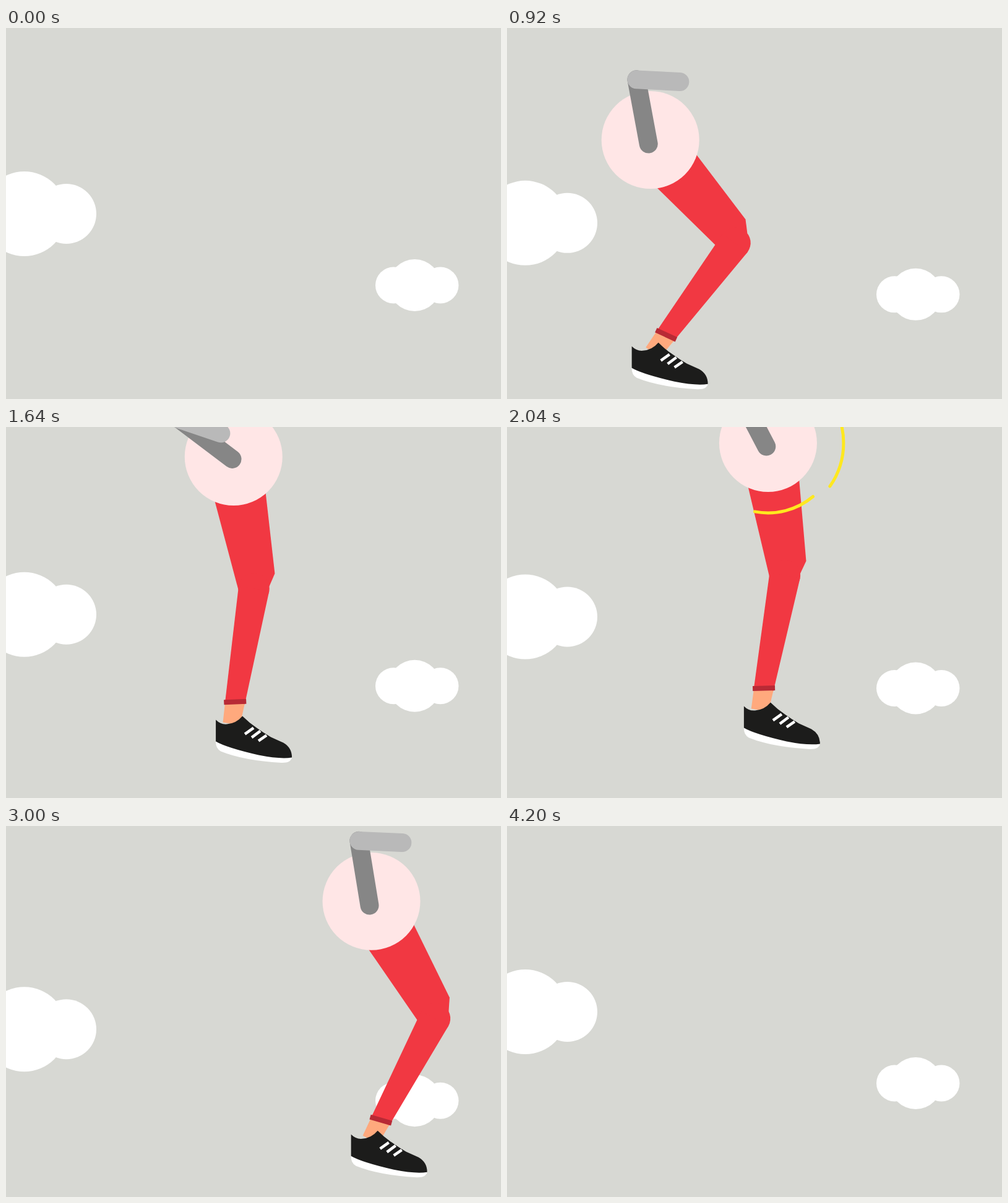
Recreate the animation shown at these times as an HTML page. Size 800 by 600 pixels, loop 4240 ms.

```html
<!DOCTYPE html>
<html lang="en">
<head>
<meta charset="utf-8">
<title>Hopper</title>
<style>
  html, body { margin: 0; width: 100%; height: 100%; overflow: hidden; background: #d7d8d3; }
  svg { display: block; width: 800px; height: 600px; }
  .cloud { fill: #fff; }
  .red { fill: #f13842; }
  .arm { stroke-width: 30; stroke-linecap: round; }
  .swoosh { fill: none; stroke: #ffe81f; stroke-width: 5; stroke-linecap: round; }
  .laces { stroke: #fff; stroke-width: 4.5; }
</style>
</head>
<body>
<svg viewBox="0 0 800 600">
  <g class="cloud" id="farCloud">
    <circle cx="626.5" cy="416" r="29.5"/>
    <circle cx="660.5" cy="416" r="42"/>
    <circle cx="702" cy="416" r="29.5"/>
  </g>
  <g id="thigh">
    <path class="red" d="M45 0 L37 197 L25 216 H-25 L-48 0Z"/>
  </g>
  <g id="calf">
    <path fill="#ffa97d" d="M-16 184 H16 L14 222 H-14Z"/>
    <circle class="red" r="25"/>
    <path class="red" d="M-25 0 H25 L16 187 H-16Z"/>
    <rect x="-18" y="-4" width="36" height="8" fill="#b82a35" transform="translate(0 186) rotate(-12)"/>
  </g>
  <g id="shoe">
    <path fill="#fff" d="M0 33 Q-1 46 8 51 Q45 66 106 69.500 Q122 70 123 60 L60 40Z"/>
    <path fill="#1c1c1b" d="M0 0 Q8 8 18 7 Q33 6 43 -6 Q54 5 66 13 Q77 21 89 28 L109 37 Q123 45 123 61 Q104 64 69 57 Q17 45 0 35Z"/>
    <path class="laces" d="M47 23 L61 13 M58 28.500 L72 18 M69 34 L82 25"/>
  </g>
  <circle id="body" r="79" fill="#ffe6e6"/>
  <path id="swoosh" class="swoosh"/>
  <line id="upperArm" class="arm" stroke="#868686"/>
  <line id="foreArm" class="arm" stroke="#b9b9b9"/>
  <g class="cloud" id="nearCloud">
    <circle cx="29.500" cy="300.500" r="68.500"/>
    <circle cx="97.500" cy="300.500" r="48.500"/>
  </g>
</svg>
<script>
const FRAME = 40, COUNT = 106, LANDING = 13, HOP_RATE = 33.7;
const THIGH = 215.5, CALF = 241.8, UPPER = 106, FORE = 70;
const GROUND = 555, REACH = 451.5;
const el = id => document.getElementById(id);
const cos = deg => Math.cos(deg * Math.PI / 180);
const sin = deg => Math.sin(deg * Math.PI / 180);

// Slow in the middle of the stage, with a small sway on every hop.
function bodyX(frame, hop) {
  const u = frame - 52.5;
  return 437.5 + 5.4 * u + 0.0022 * u ** 3 + 10 * cos(hop + 21);
}
const bodyY = hop => 101 + 93.8 * cos(hop + 1) + 14.3 * cos(2 * hop - 73);
const ankleX = hop => -17.3 + 18.3 * cos(hop + 39) + 13 * cos(2 * hop - 84);
const legLength = hop => Math.min(REACH, 423.6 - 70.6 * cos(hop) - 3 * sin(hop));

// Steady spin that slows down and speeds up again.
const armTurn = frame => 34.8 * (frame - LANDING) - 48.5 + 48.5 * cos(360 * (frame - 51) / 47);

// Floating clouds: sine waves that are all at rest when the loop restarts.
const cloudY = frame => [17.9, -6.7, 8.4, 5.9, -1.5]
  .reduce((sum, size, i) => sum + size * sin(180 * (i + 1) * frame / (COUNT - 1)), 0);

const place = (id, x, y, turn = 0) =>
  el(id).setAttribute("transform", `translate(${x} ${y}) rotate(${turn})`);

function bone(id, x0, y0, x1, y1) {
  place(id, x0, y0, Math.atan2(x0 - x1, y1 - y0) * 180 / Math.PI);
}

function bar(id, x, y, length, angle) {
  const end = [x + length * cos(angle), y + length * sin(angle)];
  const ends = { x1: x, y1: y, x2: end[0], y2: end[1] };
  for (const key in ends) el(id).setAttribute(key, ends[key]);
  return end;
}

function arc(cx, cy, r, from, to) {
  const at = a => `${cx + r * cos(a)} ${cy + r * sin(a)}`;
  return `M${at(from)} A${r} ${r} 0 0 1 ${at(to)}`;
}

function drawLeg(cx, cy, ax, ay) {
  const dist = Math.hypot(ax - cx, ay - cy);
  const dx = (ax - cx) / dist, dy = (ay - cy) / dist;
  const along = (THIGH ** 2 - CALF ** 2 + dist ** 2) / (2 * dist);
  const out = Math.sqrt(Math.max(0, THIGH ** 2 - along ** 2));
  const kx = cx + dx * along + dy * out, ky = cy + dy * along - dx * out;
  bone("thigh", cx, cy, kx, ky);
  bone("calf", kx, ky, ax, ay);
  place("shoe", ax - 22, ay - 26);
}

function drawArm(cx, cy, turn) {
  const c = cos(turn), s = sin(turn);
  const elbow = bar("upperArm", cx - 3.2 - 1.2 * c, cy + 4.3 + 2.7 * c - 2.8 * s, UPPER, turn);
  bar("foreArm", ...elbow, FORE, -0.85 - 18.9 * c + 4.95 * cos(2 * turn) - 5.1 * s);
}

// Speed lines flash up twice, trailing the spinning arm.
function drawSwoosh(cx, cy, frame) {
  const near = mid => Math.abs(frame - mid) <= 1;
  let path = "";
  if (near(13)) {
    const turn = 25 * (frame - 13);
    path = arc(cx, cy, 116, turn - 145, turn - 118) + arc(cx, cy, 97, turn - 71, turn - 44);
  } else if (near(51)) {
    const turn = 25 * (frame - 51);
    path = arc(cx, cy, 122, turn - 35, turn + 35) + arc(cx, cy, 113, turn + 50, turn + 101);
  }
  el("swoosh").setAttribute("d", path);
}

function draw(frame) {
  const hop = HOP_RATE * (frame - LANDING);
  const x = bodyX(frame, hop), y = bodyY(hop), drift = cloudY(frame);
  place("farCloud", 0, drift);
  place("nearCloud", 0, drift);
  place("body", x, y);
  drawLeg(x, y, x + ankleX(hop), Math.min(GROUND, y + legLength(hop)));
  drawSwoosh(x, y, frame);
  drawArm(x, y, armTurn(frame));
}

const start = performance.now();
function tick() {
  draw(Math.floor((performance.now() - start) / FRAME) % COUNT);
  requestAnimationFrame(tick);
}
tick();
</script>
</body>
</html>
```
